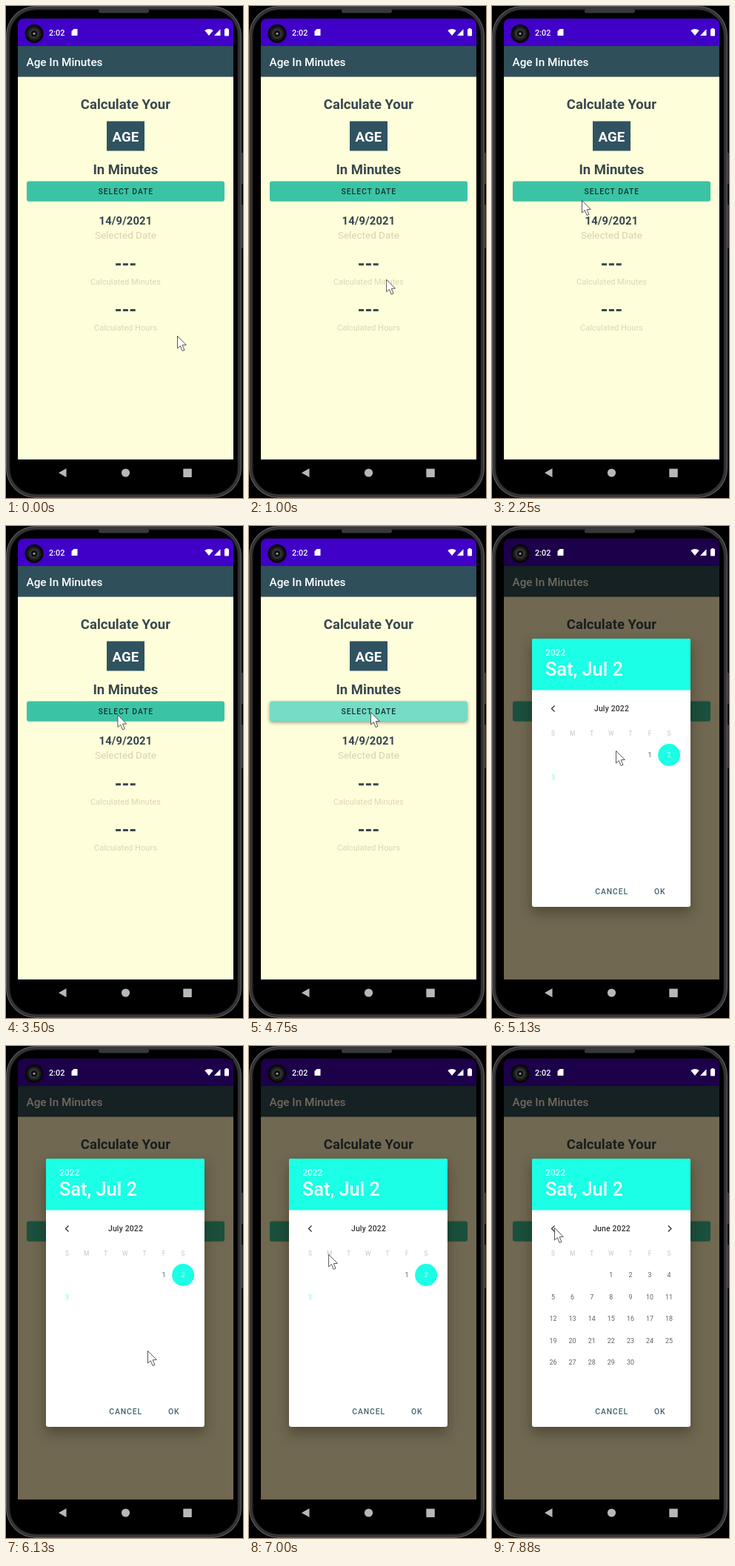
Write an HTML page with a canvas that moves like this. It is 320 by 664 pixels and loops after 8 s.

```html
<!DOCTYPE html>
<html lang="en">
<head>
<meta charset="utf-8">
<title>Age In Minutes</title>
<style>
html, body { margin: 0; width: 100%; height: 100%; overflow: hidden; background: #000; }
canvas { display: block; width: 320px; height: 664px; }
</style>
</head>
<body>
<canvas id="stage"></canvas>
<script>
const W = 320, H = 664, LOOP = 8000, STEP = 125;
const K = Math.max(1, window.devicePixelRatio || 1);
const FONT = 'Roboto, "Noto Sans", sans-serif';
const CYAN = '#1affe6', SLATE = '#2f5360', INK = '#37474f', KEY = '#b8b8b8';
const MID = 161.4;
const BOLD = { weight: 700 };
const ACTION = { weight: 500, gap: 0.93 };

function layer(canvas) {
  canvas.width = W * K;
  canvas.height = H * K;
  const ctx = canvas.getContext('2d');
  ctx.scale(K, K);
  return ctx;
}
const main = layer(document.getElementById('stage'));
const sheet = layer(document.createElement('canvas'));
let c = main;

const ramp = (t, from, to) => Math.min(1, Math.max(0, (t - from) / (to - from)));
const ease = k => k * k * (3 - 2 * k);

function mix(a, b, k) {
  const [from, to] = [a, b].map(hex => [1, 3, 5].map(i => parseInt(hex.slice(i, i + 2), 16)));
  return 'rgb(' + from.map((v, i) => Math.round(v + (to[i] - v) * k)) + ')';
}

function box(x, y, w, h, fill, r = 0) {
  c.fillStyle = fill;
  c.beginPath();
  c.roundRect(x, y, w, h, r);
  c.fill();
}
function shadowBox(alpha, blur, drop, ...shape) {
  c.save();
  c.shadowColor = `rgba(30,25,10,${alpha})`;
  c.shadowBlur = blur * K;
  c.shadowOffsetY = drop * K;
  box(...shape);
  c.restore();
}
function disc(x, y, r, fill) {
  box(x - r, y - r, 2 * r, 2 * r, fill, r);
}
function poly(points, fill) {
  c.beginPath();
  points.forEach(([x, y]) => c.lineTo(x, y));
  c.closePath();
  c.fillStyle = fill;
  c.fill();
}
function text(s, x, y, size, fill, { weight = 400, align = 'center', gap = 0 } = {}) {
  c.font = `${weight} ${size}px ${FONT}`;
  c.textAlign = align;
  c.letterSpacing = gap + 'px';
  c.fillStyle = fill;
  c.fillText(s, align === 'center' ? x + gap / 2 : x, y);
}
const label = (s, x, y, size, fill, style) => text(s, x, y, size, fill, { ...style, align: 'left' });

function chevron(x, dir) {
  c.strokeStyle = '#333';
  c.lineWidth = 1.3;
  c.beginPath();
  for (const side of [-1, 0, 1]) c.lineTo(x + (side ? -2 : 2) * dir, 246.5 + side * 4);
  c.stroke();
}

// Nested rounded rings make the metal rim
function phone() {
  box(0, 0, W, H, '#000');
  box(316, 198, 4, 42, '#343236', 1);
  box(316, 268, 4, 59, '#343236', 1);
  ['#59575b', '#2c2b2e', '#3c3b3e', '#1c1b1d', '#000'].forEach((fill, i) => {
    const inset = i * 1.4;
    box(inset, inset, 318 - 2 * inset, H - 2 * inset, fill, 40 - inset);
  });
  box(125, 4, 68, 5.5, '#39383b', 2.7);
}

function statusBar() {
  ['#080808', '#1b1b1d', '#333335', '#111', '#aaa'].forEach((fill, i) => {
    disc(38, 37.3, 12.6 - i * 2.8, fill);
  });
  label('2:02', 58, 40, 10.8, '#fff', { weight: 500 });
  poly([[91.5, 31], [96.5, 31], [96.5, 40], [88.5, 40], [88.5, 34]], '#fff');
  c.beginPath();
  c.moveTo(274, 40);
  c.arc(274, 40, 9, -Math.PI * 0.72, -Math.PI * 0.28);
  c.fill();
  poly([[281, 40], [289.5, 31.3], [289.5, 40]], '#fff');
  box(295, 31, 6, 9.5, '#fff', 1);
  box(296.5, 30, 3, 2, '#fff');
}

function app(press) {
  box(16, 17, 291, 37, '#4000c8', [8, 8, 0, 0]);
  box(16, 54, 291, 41.5, '#2f4f5b');
  box(16, 95.5, 291, 516.5, '#fffeda');
  label('Age In Minutes', 27.5, 80.5, 15.3, '#fff', { weight: 500 });

  text('Calculate Your', MID, 138.5, 18.5, INK, BOLD);
  box(136, 155.5, 51, 40, SLATE);
  text('AGE', MID, 183, 18.7, '#fff', BOLD);
  text('In Minutes', MID, 227, 18.5, INK, BOLD);
  shadowBox(0.25 + press * 0.2, 1 + press * 4, 0.4 + press * 1.4,
    28, 236.5, 267, 27, mix('#3ac4a5', '#75dcc6', press), 3);
  text('SELECT DATE', MID, 254, 10.4, '#14332d', ACTION);
  text('14/9/2021', MID, 295, 14.8, INK, { weight: 700, gap: 0.15 });
  text('Selected Date', MID, 313.5, 13.5, '#d8d0b0');

  ['Minutes', 'Hours'].forEach((unit, row) => {
    const y = 376 + row * 61.8;
    for (const i of [-1, 0, 1]) box(MID + i * 9.8 - 3.5, y - 28.8, 7, 3, INK);
    text('Calculated ' + unit, MID, y, 11.1, '#ddd5b6');
  });
}

function dimScreen(dim) {
  c.save();
  c.globalCompositeOperation = 'multiply';
  box(16, 17, 291, 595, mix('#ffffff', '#70685e', dim));
  c.restore();
}

function navBar() {
  poly([[71, 630], [81.5, 624], [81.5, 636]], KEY);
  disc(161.5, 630, 5.6, KEY);
  box(239.3, 624.5, 11.5, 11.5, KEY, 0.8);
}

function month(title, start, last, x, picked) {
  const column = i => 82.5 + (i % 7) * 26.1;
  c.save();
  c.translate(x, 0);
  text(title, MID, 250, 10.4, '#333', { weight: 500, gap: 0.18 });
  [...'SMTWTFS'].forEach((d, i) => text(d, column(i), 283.3, 8.4, '#c4c4c4'));
  for (let n = 1; n <= last; n++) {
    const cell = start + n - 1;
    const y = 309 + Math.floor(cell / 7) * 29.55;
    if (n === picked) disc(column(cell), y, 15, CYAN);
    const fill = !picked || n < picked ? '#606060' : n === picked ? '#c8fff8' : '#7df2e6';
    text(n, column(cell), y + 3.1, 8.9, fill);
  }
  c.restore();
}

function dialog(alpha, calendar, slide) {
  c = sheet;
  c.clearRect(0, 0, W, H);
  shadowBox(0.4, 17, 8, 54, 152, 214, 362, '#fff', 3);
  box(54, 152, 214, 69.5, CYAN, [3, 3, 0, 0]);
  label('2022', 72.3, 175, 11.9, 'rgba(255,255,255,.75)', { weight: 500 });
  label('Sat, Jul 2', 72, 202, 25.4, '#fff', { weight: 500 });
  label('CANCEL', 139.2, 496.5, 10.4, '#426570', ACTION);
  label('OK', 219, 496.5, 10.4, '#426570', ACTION);

  c.save();
  c.globalAlpha = calendar;
  c.beginPath();
  c.rect(54, 222, 214, 254);
  c.clip();
  month('July 2022', 5, 3, slide * 214, 2);
  month('June 2022', 3, 30, (slide - 1) * 214, 0);
  chevron(82.5, -1);
  if (slide > 0) chevron(240, 1);
  c.restore();

  c = main;
  c.globalAlpha = alpha;
  c.drawImage(sheet.canvas, 0, 0, W, H);
  c.globalAlpha = 1;
}

function pointer(x, y) {
  c.save();
  c.translate(x + 0.5, y + 0.5);
  poly([[0, 0], [0, 16.5], [3.8, 13.2], [6.6, 20], [9.4, 18.8], [6.7, 12.2], [11.8, 12]], '#fff');
  c.strokeStyle = '#444';
  c.lineWidth = 0.9;
  c.stroke();
  c.restore();
}

// Where the hand rests, and when it arrives
const stops = [
  { t: 0, x: 231, y: 445 },
  { t: 2250, x: 121, y: 262 },
  { t: 4250, x: 164, y: 251 },
  { t: 4875, x: 164, y: 251 },
  { t: 5125, x: 167, y: 303 },
  { t: 6125, x: 191, y: 411 },
  { t: 7375, x: 84, y: 245 }
];
function hand(t) {
  let { x, y } = stops[0];
  stops.slice(1).forEach((stop, i) => {
    const k = ease(ramp(t, stops[i].t, stop.t));
    x += (stop.x - stops[i].x) * k;
    y += (stop.y - stops[i].y) * k;
  });
  return [x, y];
}

function draw(t) {
  const open = ramp(t, 4750, 5125);
  phone();
  app(open ? 0 : ramp(t, 4500, 4750));
  dimScreen(open ** 2);
  statusBar();
  navBar();
  if (open) dialog(1 - (1 - open) ** 3.6, ramp(open, 0.34, 0.7), ease(ramp(t, 7500, 7750)));
  pointer(...hand(t));
}

const begin = performance.now();
function tick() {
  const t = (performance.now() - begin) % LOOP;
  draw(Math.floor(t / STEP) * STEP);
  requestAnimationFrame(tick);
}
tick();
</script>
</body>
</html>
```
